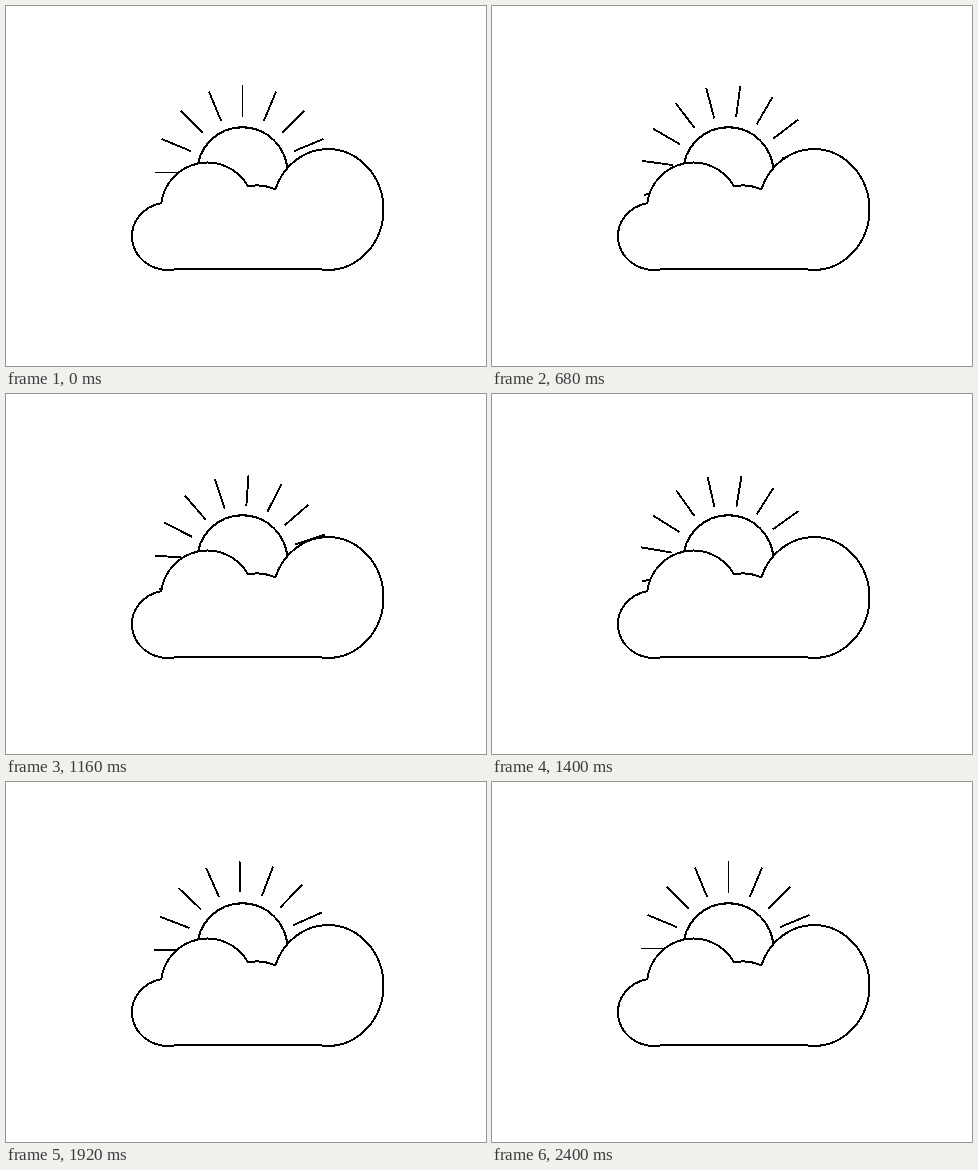
These frames come from a looping animation (480x360 px, 2440 ms). An HTML page:

```html
<!DOCTYPE html>
<html>
<head>
<meta charset="utf-8">
<style>
html, body { margin: 0; width: 100%; height: 100%; overflow: hidden; background: #fff; }
svg { display: block; width: 480px; height: 360px; }
</style>
</head>
<body>
<svg viewBox="0 0 480 360" fill="#fff" stroke="#000" stroke-width="2" shape-rendering="crispEdges">
  <path id="rays" stroke-width="1.9"/>
  <circle cx="236.3" cy="166.3" r="45"/>
  <path d="M162 264A36.2 33.7 0 0 1 155.3 197.2A46.5 46.5 0 0 1 242 180.3A45 45 0 0 1 269.3 183.5
           A56 60.5 0 0 1 321.5 143A56 60.5 0 0 1 321.5 264L312 263.2H171Z" stroke-linejoin="round"/>
</svg>
<script>
const LOOP = 2440, STEP = 40, START = 480, STEPS = 48, RAYS = 16;
const CENTER = [236.5, 166.5];
const PIVOT = [235.7, 167.1]; // the rays turn slightly off their own center
const rays = document.getElementById('rays');

const point = (angle, radius) =>
  `${CENTER[0] + radius * Math.sin(angle)} ${CENTER[1] - radius * Math.cos(angle)}`;

rays.setAttribute('d', Array.from({ length: RAYS }, (_, i) => {
  const angle = i * 2 * Math.PI / RAYS;
  return `M${point(angle, 56)}L${point(angle, 87.5)}`;
}).join(''));

// cubic-bezier(.42, 0, .58, 1)
function easeInOut(x) {
  let low = 0, high = 1;
  for (let i = 0; i < 30; i++) {
    const mid = (low + high) / 2;
    if (1.26 * mid - 0.78 * mid ** 2 + 0.52 * mid ** 3 < x) low = mid;
    else high = mid;
  }
  return low * low * (3 - 2 * low);
}

function draw() {
  const time = performance.now() % LOOP;
  const step = Math.min(STEPS, Math.max(0, Math.floor((time - START) / STEP)));
  // A full turn looks the same as none
  const turn = step % STEPS ? 360 * easeInOut(step / STEPS) : 0;
  rays.setAttribute('transform', `rotate(${turn} ${PIVOT})`);
  requestAnimationFrame(draw);
}
draw();
</script>
</body>
</html>
```
